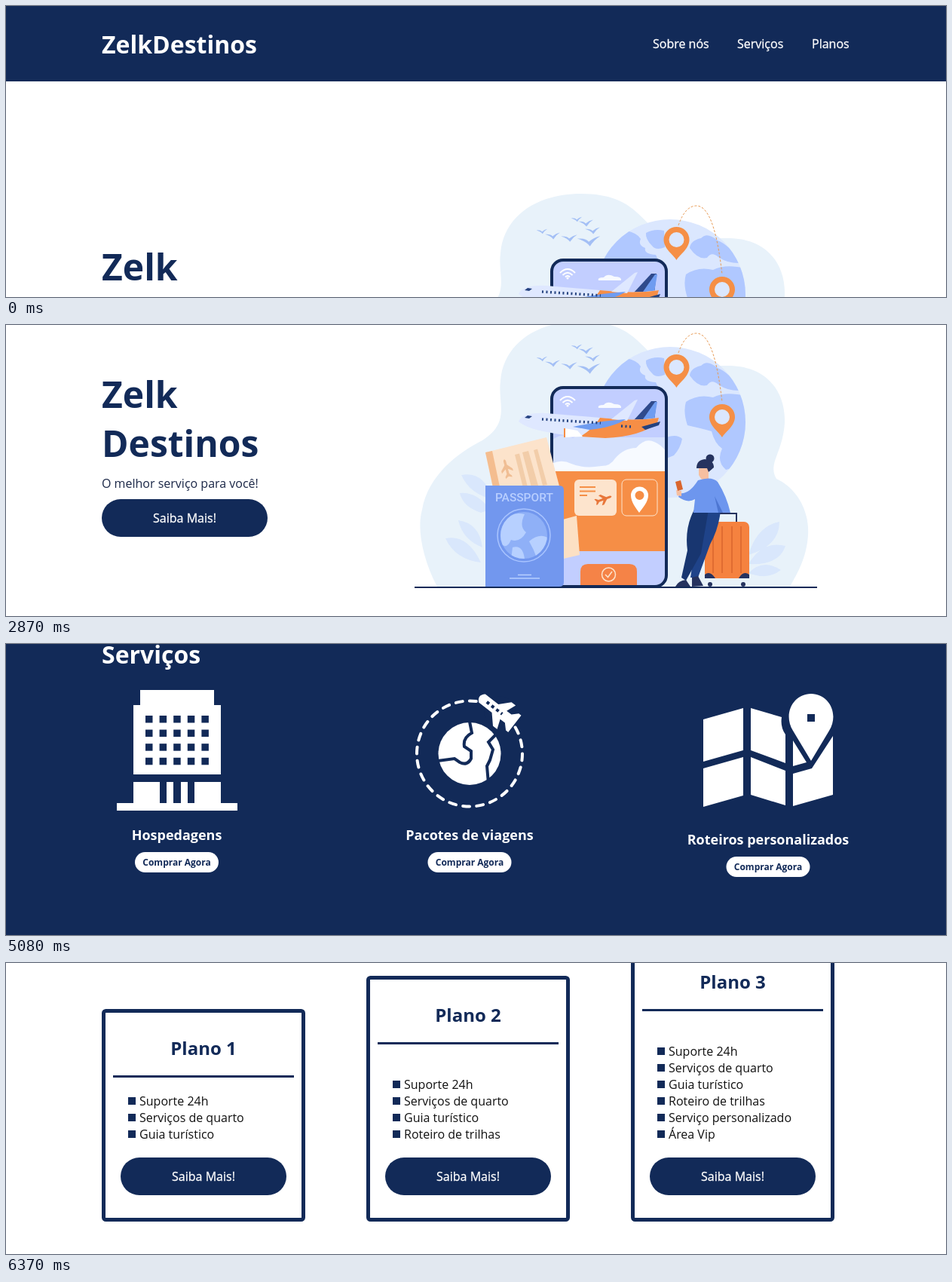
Write an HTML page that moves like this. It is 1247 px wide and 386 px high and loops after 6.7 s.

```html
<!DOCTYPE html>
<html lang="pt">
<head>
<meta charset="utf-8">
<title>Zelk Destinos</title>
<style>
html, body { margin: 0; width: 100%; height: 100%; overflow: hidden; background: #fff; }
svg { display: block; width: 1247px; height: 386px; max-width: 100%; max-height: 100%; overflow: hidden; }
text { font: 400 16px "Open Sans", sans-serif; fill: #111; }
.b { font-weight: 700; }
.h1 { font-size: 48px; }
.h2 { font-size: 32px; }
.h3 { font-size: 24px; }
.h4 { font-size: 18px; }
.sm { font-size: 12px; }
.n { fill: #122a58; }
.w { fill: #fff; }
.p { fill: #1c2848; }
.c { text-anchor: middle; }
text.w:not(.b) { stroke: #fff; stroke-width: .3px; }
.pass { font: 500 15.5px Roboto, sans-serif; fill: #b9cfff; }
</style>
</head>
<body>
<svg width="1247" height="386">
<defs>
  <path id="bird" fill="#a3bff5" d="M-9-2Q-2-2.500 0 .5Q4-3 9-4Q4-1 1 4Q-2 0-9-2Z"/>
  <g id="pin">
    <path fill="#f58f46" d="M0 27C-4 20-17 12-17 0A17 17 0 0 1 17 0C17 12 4 20 0 27Z"/>
    <circle r="10" fill="#dbe7fe"/>
  </g>
  <path id="jet" d="M-7-1.500L-1-1.500L-5-7H-2L4-1.500H9Q13 0 9 1.500H4L-2 7H-5L-1 1.500H-7L-10 4H-12L-10 0L-12-4H-10Z"/>
  <clipPath id="world"><circle cx="881" cy="270" r="100"/></clipPath>
  <clipPath id="screen"><rect x="725" y="225" width="150" height="263" rx="14"/></clipPath>
  <clipPath id="seal"><circle cx="687" cy="420" r="31"/></clipPath>
</defs>
<g id="page">
  <rect class="n" width="1247" height="100"/>
  <text class="b h2 w" x="127" y="63">ZelkDestinos</text>
  <text class="w" x="858" y="56">Sobre nós</text>
  <text class="w" x="970" y="56">Serviços</text>
  <text class="w" x="1069" y="56">Planos</text>

  <text class="b h1 n" x="127" y="364">Zelk</text>
  <text class="b h1 n" x="127" y="429">Destinos</text>
  <text class="p" x="127" y="470">O melhor serviço para você!</text>

  <g id="hero" transform="translate(0 113)">
    <path fill="#e8f2fa" d="M572 488C552 450 545 410 552 386C560 340 600 310 632 294C670 270 652 245 656 215C660 165 705 136 763 136C830 136 840 170 862 183C890 198 935 195 960 195C1010 196 1034 230 1033 270C1031 310 1010 325 1022 345C1050 358 1066 388 1064 420C1062 450 1050 470 1040 488Z"/>
    <g fill="#d9e7fc">
      <path d="M604 340Q634 334 646 372Q616 366 604 340ZM602 364Q625 362 642 386L630 390Q606 382 602 364ZM583 424Q612 418 630 456Q596 452 583 424ZM600 400Q628 404 632 436Q606 426 600 400Z"/>
      <path d="M985 446Q996 408 1026 402Q1026 434 985 446ZM985 458Q1004 426 1034 434Q1026 460 985 458ZM985 470Q1004 450 1028 466Q1010 480 985 470Z"/>
    </g>
    <circle cx="881" cy="270" r="100" fill="#dbe7fe"/>
    <g fill="#b0c8ff" clip-path="url(#world)">
      <path d="M780 230Q794 200 822 185Q838 188 842 196Q838 204 848 208Q846 216 862 217L866 226H780Z"/>
      <path d="M849 188Q860 182 873 185L874 207Q862 212 857 205Q848 196 849 188Z"/>
      <path d="M907 208Q908 198 922 195Q930 186 944 198Q960 204 975 228Q958 229 945 220Q936 212 930 221Q918 224 907 208Z"/>
      <path d="M902 243Q918 232 938 237Q955 228 985 236V300Q975 330 955 333Q942 322 950 305Q940 298 936 282Q918 277 904 274Q898 256 902 243Z"/>
      <path d="M876 290Q890 285 897 292Q895 304 886 314L876 318Z"/>
    </g>
    <path fill="none" stroke="#e79a55" stroke-dasharray="3 2" d="M892 178Q901 152 916 152C936 152 945 200 950 243"/>
    <use href="#pin" x="889.5" y="197"/>
    <use href="#pin" x="950" y="263"/>
    <g id="birds"></g>

    <g clip-path="url(#screen)">
      <rect x="722" y="222" width="156" height="270" fill="#c2ceff"/>
      <path fill="#d5e1fd" d="M722 296Q736 282 752 291Q770 278 792 290H878V340H722Z"/>
      <path fill="#f7faff" d="M722 326Q736 318 750 325Q766 332 790 328Q802 328 808 318Q820 304 836 304Q848 290 860 296Q870 300 878 312V336H722Z"/>
      <rect x="722" y="335" width="156" height="106" fill="#f68e46"/>
    </g>
    <path fill="#f7faff" d="M786 251Q784 247 793 247Q798 241 807 246Q817 246 816 251Z"/>
    <path fill="none" stroke="#fff" stroke-width="2" d="M735 241Q745 231 755 241M738.500 244Q745 237.500 751.500 244M742 246.500Q745 243.500 748 246.500"/>
    <circle cx="745" cy="248" r="1.500" fill="#fff"/>
    <rect x="754" y="346" width="56" height="48" rx="6" fill="#fde4cd"/>
    <path stroke="#f58f46" stroke-width="2" d="M761 356H782M761 361.500H782M761 367H771"/>
    <use href="#jet" fill="#e8763a" transform="translate(793 372) rotate(-20)"/>
    <rect x="817" y="346" width="47" height="48" rx="6" fill="none" stroke="#fde4cd"/>
    <path fill="#fff" fill-rule="evenodd" d="M840 390C836 384 829 376 829 367A11.500 11.500 0 0 1 852 367C852 376 844 384 840 390ZM840.500 361A6 6 0 1 0 840.500 373A6 6 0 1 0 840.500 361Z"/>
    <path fill="#f58347" d="M762 486V468Q762 458 772 458H827Q837 458 837 468V486Z"/>
    <circle cx="799.500" cy="472" r="9" fill="none" stroke="#fde4cd" stroke-width="1.500"/>
    <path fill="none" stroke="#fde4cd" stroke-width="1.500" d="M795 472L798.500 475.500L804 468"/>
    <rect x="724" y="224" width="152" height="264" rx="15" fill="none" stroke="#122a58" stroke-width="4"/>

    <path fill="#2f4a8c" d="M833 267L856 242H863L860 268Z"/>
    <path fill="#6f9cf0" d="M845 266L861 243L864 243L860 266Z"/>
    <path fill="#dfe8ff" d="M680 269C684 260 698 257 716 258L788 264Q830 269 866 264L864 271Q842 287 800 290Q750 290 718 283Q690 278 680 269Z"/>
    <path fill="#f68e46" d="M788 264Q835 269 866 264L864 271Q842 289 795 291L762 289Q780 278 788 264Z"/>
    <path fill="#dfe8ff" d="M803 266L834 241L838 240L824 268Z"/>
    <path fill="#6f9cf0" d="M752 276Q790 268 822 266Q808 276 774 280Z"/>
    <path fill="#24427f" d="M843 276L868 269L866 274L848 280ZM688 264L692 261L698 262L694 265Z"/>
    <path stroke="#24427f" stroke-width="3.500" stroke-dasharray="2 3.500" d="M711 266L789 271M816 275L830 276"/>
    <path fill="#fff" d="M741 278L758 281L765 289L741 290Z"/>
    <path stroke="#f68e46" stroke-width="2" d="M741 278V290"/>

    <path fill="#fce0c4" d="M735 400L757 394L761 446L735 452Z"/>
    <path fill="#fce3cb" d="M636 310L717 290L737 366L652 386Z"/>
    <path fill="#f4bd8f" d="M636 310L645 308L661 384H652Z"/>
    <path fill="#f2cda9" d="M675 313L681 311.500L692 356L686 357ZM685 310L693 308L706 354L697 356ZM700 307L705 305.500L718 353L712 354Z"/>
    <use href="#jet" fill="#f0be94" transform="translate(664 331) rotate(-105) scale(1.100)"/>
    <path fill="#7297ee" d="M636 488V354H734Q740 354 740 360V482Q740 488 734 488Z"/>
    <text class="pass c" x="687.5" y="375">PASSPORT</text>
    <circle cx="687" cy="420" r="35" fill="none" stroke="#a9c4ff" stroke-width="1.500"/>
    <circle cx="687" cy="420" r="31" fill="#8fb0f7"/>
    <path fill="#b7d0ff" clip-path="url(#seal)" d="M655 400Q672 388 688 392Q680 408 690 416Q682 430 670 426Q664 440 655 430ZM694 428Q708 416 720 424Q718 446 704 450Q700 438 694 428ZM672 436Q686 432 688 452H670Z"/>
    <path stroke="#b7d0ff" stroke-width="1.500" d="M679 472.500H697M668 477H708"/>

    <path fill="none" stroke="#26335f" stroke-width="2" d="M944 404V391H969V404"/>
    <rect x="927" y="402" width="59" height="75" rx="7" fill="#f5823f"/>
    <path stroke="#d9652e" stroke-width="1.500" d="M938 408V470M950 408V470M963 408V470M975 408V470"/>
    <path fill="#26335f" d="M927 477V472Q934 466 941 477ZM972 477Q978 466 986 472V477Z"/>
    <circle cx="934" cy="485" r="3" fill="#26335f"/><circle cx="978" cy="485" r="3" fill="#26335f"/>
    <path fill="#1f4389" d="M914 386H948Q946 410 934 432L918 476H908L915 430Z"/>
    <path fill="#183670" d="M913 386H932L922 444L902 480L896 476L904 440Q900 410 913 386Z"/>
    <path fill="#26335f" d="M888 488Q892 480 902 479L908 488ZM910 488V476L918 474L925 487Z"/>
    <path fill="#f6bfa0" d="M919 328H932V345Q930 350 922 345L919 340Z"/>
    <circle cx="934" cy="318" r="5.500" fill="#26335f"/>
    <path fill="#26335f" d="M916 331Q916 320 927 319Q939 320 939 330L932 336L930 331Z"/>
    <path fill="#6d96ee" d="M918 347Q936 341 944 349Q956 368 961 390H912L914 372Q904 378 892 369L894 364Q906 366 918 347Z"/>
    <path fill="#4d76d2" d="M940 368L945 390H951Z"/>
    <path fill="#f6bfa0" d="M889 360L896 361L896 368L890 367Z"/>
    <path fill="#d9652e" d="M888 349L895 347L898 359L891 361Z"/>
    <path stroke="#122a58" stroke-width="2" d="M542 489H1076"/>
  </g>

  <rect class="n" x="547" y="802" width="5" height="50"/>
  <text class="b h2 n" x="557" y="836">Quem somos</text>
  <text class="p" x="547" y="889">It is a long established fact that a reader will be distracted by the</text>
  <text class="p" x="547" y="911">readable content of a page when looking at its layout.</text>
  <text class="p" x="547" y="943">The point of using Lorem Ipsum is that it has a more-or-less normal</text>
  <text class="p" x="547" y="965">distribution of letters, as opposed to using 'Content here, content</text>
  <text class="p" x="547" y="987">here', making it look like readable English.</text>

  <g id="about" transform="translate(0 801)">
    <path fill="#e8f2fb" d="M167 203C148 180 148 148 167 130C190 108 238 112 260 92C282 70 272 42 300 20C320 2 355 1 380 5C415 12 430 40 427 70C430 95 460 88 485 94C515 102 526 130 524 158Q522 185 505 203Z"/>
    <path stroke="#7da4e8" stroke-width="2" d="M303 16V28M386 6V40"/>
    <rect x="300" y="28" width="50" height="11" fill="#f0a04f"/>
    <rect x="340" y="29" width="9" height="9" fill="#fce9d2"/>
    <path fill="none" stroke="#f0a04f" d="M343 31L346 33.500L343 36"/>
    <rect x="294" y="39" width="101" height="57" fill="#456ba8"/>
    <g id="rows" fill="#eef4ff"></g>

    <path fill="none" stroke="#e08a3c" stroke-width="2" d="M190 152V142Q190 139 193 139H203Q206 139 206 142V152"/>
    <path fill="#b84a37" d="M291 83Q290 72 300 73Q309 74 309 84L316 103Q312 118 303 113L290 104Z"/>
    <path fill="#f3b296" d="M293 79H302V94L298 98L293 92Z"/>
    <path fill="#6a9ff0" d="M291 77Q297 68 306 75ZM288 95L293 92L298 104L304 93L311 97L320 123L314 128H282L276 122Z"/>
    <path fill="#fff" d="M293 93L298 105L303 94Z"/>
    <path fill="#3567ab" d="M243 117L262 115L268 128H249ZM319 118L336 116L330 128H310Z"/>
    <path fill="#bfd6fc" d="M207 134H376V165H207Z"/>
    <path fill="#6a9ff0" d="M207 165H376V203H207Z"/>
    <path fill="#a9c6f8" d="M291 148H312V165H291Z"/>
    <rect x="201" y="127" width="179" height="8" rx="3" fill="#446aaa"/>

    <path fill="#a8663f" d="M214 157H230L227 196L229 203H216L220 194L214 203H208L213 194Z"/>
    <path fill="#26335f" d="M214 130H231Q235 145 232 160H212Q211 144 214 130ZM215 92Q212 82 220 79Q232 79 229 90L224 94Z"/>
    <path fill="#f3b296" d="M219 88H229V98L223 102L218 98Z"/>
    <path fill="#f0953f" d="M211 104Q221 95 231 101L235 118L247 122L245 127L231 125L230 133H212Z"/>
    <path fill="#c9602f" d="M220 100H225L223 131H218Z"/>
    <rect x="177" y="150" width="38" height="48" rx="6" fill="#f0a04f"/>
    <path stroke="#d9812f" stroke-width="1.500" d="M185 154V194M196 154V194M207 154V194"/>
    <path fill="#26335f" d="M181 198H187V203H181ZM205 198H211V203H205Z"/>

    <path fill="#234a8c" d="M412 136H438L440 168L427 190L438 203H424L416 190L422 168L408 201H398L402 180Z"/>
    <path fill="#1c3a72" d="M398 203V199L408 198L413 203ZM420 203L418 198L430 196L441 203Z"/>
    <path fill="#f3b296" d="M420 70H432V84L426 90L420 86Z"/>
    <path fill="#26335f" d="M419 78Q416 67 424 65Q434 63 435 70L424 72Z"/>
    <path fill="#bb4f41" d="M416 88Q428 81 437 89Q443 112 440 139H411L412 118L407 130L402 126Q406 100 416 88Z"/>
    <path fill="none" stroke="#5d8a54" stroke-width="2" d="M383 146L397 130Q401 126 408 131L403 150"/>
    <g transform="translate(376 173) rotate(24)">
      <rect x="-20" y="-28" width="41" height="54" rx="7" fill="#a2c98a"/>
      <path stroke="#7eab68" stroke-width="2" d="M-11-24V22M0-24V22M11-24V22"/>
    </g>
    <path fill="#26335f" d="M360 198H366V203H360ZM382 198H388V203H382Z"/>

    <path fill="#74b3c0" d="M448 146H468Q478 164 480 178L488 197L482 199L468 172L461 160L461 194H454Z"/>
    <path fill="#26335f" d="M452 203L455 194H461V203ZM479 199L487 196L492 203H484ZM441 111Q448 104 453 91Q460 85 467 92Q473 106 464 111L450 116Z"/>
    <path fill="#a8663f" d="M457 94H466V106L460 109ZM484 113L494 107L498 110L488 117Z"/>
    <path fill="#a2c98a" d="M447 107Q460 102 468 109L472 117L486 111L488 117L472 127L467 126L469 149H447L441 124Z"/>
    <path fill="none" stroke="#3567ab" d="M447 139L463 108"/>
    <path fill="#4f7fd6" d="M442 139H462L463 150Q452 154 443 150Z"/>
    <path stroke="#26405f" stroke-width="1.500" d="M145 203H529"/>
  </g>

  <rect class="n" y="1048" width="1247" height="479"/>
  <text class="b h2 w" x="127" y="1132">Serviços</text>
  <g class="w" transform="translate(0 1106)">
    <path d="M178 61H276V81H285V173H169V81H178ZM169 183H204V211H213V183H222V211H232V183H241V211H250V183H285V211H307V221H147V211H169Z"/>
    <g id="windows" class="n"></g>

    <circle cx="615" cy="145.500" r="70" fill="none" stroke="#fff" stroke-width="4" stroke-linecap="round" stroke-dasharray="9 9.330" pathLength="440"/>
    <circle class="n" cx="655" cy="90" r="21"/>
    <circle cx="615" cy="145.500" r="41.500"/>
    <path fill="none" stroke="#122a58" stroke-width="4" d="M615 103L618 118Q606 124 608 136L617 142V152Q612 162 602 157L595 152L573 155M650 120L640 130L646 140L642 154L638 162L640 185"/>
    <g transform="translate(652 88) rotate(38)">
      <path d="M-26-7H-4L8-20H15L10-7H18L25-14H29V14H25L18 7H10L15 20H8L-4 7H-26Q-34 0-26-7Z"/>
      <path stroke="#122a58" stroke-width="4" stroke-dasharray="4 4" d="M-18 0H8"/>
    </g>

    <path d="M925 100L978 85V141L925 156ZM925 165L978 150V201L925 216ZM988 85L1029 97Q1027 110 1034 120V158L988 141ZM988 150L1034 168V214L988 200ZM1044 128L1062 157L1044 162ZM1044 172L1069 165L1097 122V200L1044 215Z"/>
    <path d="M1068 155L1044 115C1030 92 1045 66 1068 66S1106 92 1092 115Z"/>
    <rect class="n" x="1063" y="93" width="10" height="10"/>
  </g>

  <text class="b h2 n" x="127" y="1611">Planos</text>
</g>
</svg>
<script>
const page = document.getElementById('page');
const add = (html, id = 'page') => document.getElementById(id).insertAdjacentHTML('beforeend', html);
const rect = (x, y, w, h, extra = '') => `<rect x="${x}" y="${y}" width="${w}" height="${h}" ${extra}/>`;
const text = (x, y, cls, str) => `<text x="${x}" y="${y}" class="${cls}">${str}</text>`;
const button = (x, y) =>
  rect(x, y, 220, 50, 'rx="25" class="n"') + text(x + 110, y + 31, 'w c', 'Saiba Mais!');

add(button(127, 485));

[[711, 186, .8], [725, 192, 1.1], [747, 195, 1.2], [773, 199, 1.7], [757, 170, .8], [769, 175, 1.1], [778, 185, 1.1]]
  .forEach(([x, y, s]) => add(`<use href="#bird" transform="translate(${x} ${y}) scale(${s})"/>`, 'birds'));

for (let r = 0; r < 3; r++) {
  const y = 48 + r * 15;
  add(rect(301, y, 5, 9) + rect(308, y, 5, 9), 'rows');
  [70, 74, 68].forEach((w, i) => add(rect(315, y + i * 3.7, w, 1.4), 'rows'));
}

for (let r = 0; r < 4; r++)
  for (let c = 0; c < 5; c++) add(rect(185 + c * 18.6, 95 + r * 18.6, 9.5, 9.5), 'windows');

[[226.5, 0, 'Hospedagens'], [615, 0, 'Pacotes de viagens'], [1011, 6, 'Roteiros personalizados']]
  .forEach(([x, dy, name]) => add(
    text(x, 1366 + dy, 'b h4 w c', name) +
    rect(x - 55.5, 1382 + dy, 111, 27, 'rx="13.5" class="w"') +
    text(x, 1400 + dy, 'b sm n c', 'Comprar Agora')));

const perks = ['Suporte 24h', 'Serviços de quarto', 'Guia turístico', 'Roteiro de trilhas', 'Serviço personalizado', 'Área Vip'];
[[127, 1708, 3], [478, 1664, 4], [829, 1620, 6]].forEach(([x, y, count], i) => {
  add(rect(x + 2.5, y + 2.5, 265, 1990 - y - 5, 'rx="3" fill="#fff" stroke="#122a58" stroke-width="5"') +
    text(x + 135, y + 61, 'b h3 n c', `Plano ${i + 1}`) +
    rect(x + 15, y + 88, 240, 3, 'class="n"') + button(x + 25, 1905));
  perks.slice(0, count).forEach((perk, k) => {
    const base = 1880 - (count - 1 - k) * 22;
    add(rect(x + 35, base - 11, 10, 10, 'class="n"') + text(x + 50, base, '', perk));
  });
});

// Wheel scrolls: start ms, length ms, scroll position reached, progress per step.
const LOOP = 6700;
const four = [.1, .5, .88, 1], five = [.007, .27, .705, .95, 1];
const scrolls = [
  [1710, 210, 100, four],
  [2320, 150, 200, [.13, .75, 1]],
  [2800, 280, 400, five],
  [3280, 270, 600, five],
  [3750, 200, 800, four],
  [4140, 270, 1000, five],
  [4670, 210, 1100, four],
  [5080, 360, 1300, [.03, .22, .52, .82, .96, 1], 90],
  [5640, 270, 1500, five],
  [6100, 270, 1647, five]
];
const key = (ms, y) => ({ offset: ms / LOOP, transform: `translateY(${-y}px)`, easing: 'step-end' });
const keys = [key(0, 0)];
let from = 0;
for (const [start, length, to, steps, lead = 70] of scrolls) {
  steps.forEach((p, i) => {
    const wait = i ? lead + (i - 1) * (length - lead) / (steps.length - 2) : 0;
    keys.push(key(start + Math.floor(wait / 10 + .001) * 10, Math.round(from + (to - from) * p)));
  });
  from = to;
}
keys.push(key(LOOP, from));
page.animate(keys, { duration: LOOP, iterations: Infinity });
</script>
</body>
</html>
```
